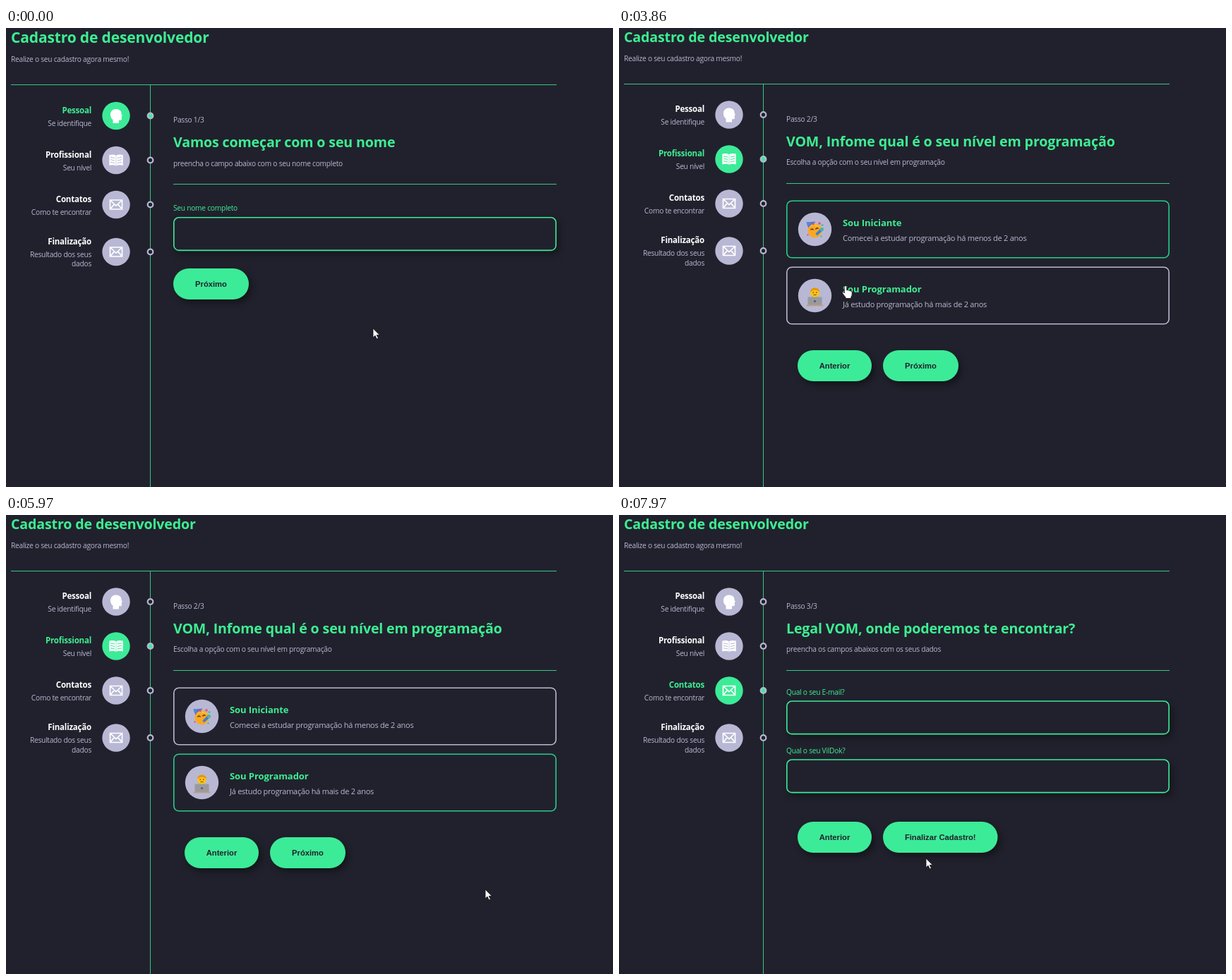
Animation of 860 by 651 pixels, one loop 8 s. Source, as an HTML page:

```html
<!DOCTYPE html>
<html lang="pt-BR">
<head>
<meta charset="utf-8">
<title>Cadastro</title>
<style>
  html, body { margin: 0; width: 100%; height: 100%; overflow: hidden; background: #21212d; }
  svg { display: block; width: 860px; height: 651px; }
  text { font-family: 'Open Sans', 'Noto Sans', sans-serif; white-space: pre; }
  .title { font-size: 19.6px; font-weight: 700; letter-spacing: -.007em; fill: #3def92; }
  .big { font-size: 21px; }
  .small { font-size: 10.2px; letter-spacing: -.0245em; fill: #b8b8d4; }
  .label { fill: #3def92; }
  .step { font-size: 11.5px; font-weight: 700; letter-spacing: -.0175em; fill: #fff; }
  .step.on { fill: #3def92; }
  .option { font-size: 13px; font-weight: 700; letter-spacing: -.005em; fill: #3def92; }
  .detail { font-size: 11px; letter-spacing: -.0235em; fill: #b8b8d4; }
  .value { font-size: 12px; fill: #fff; }
  .btn { font: 700 11.2px 'Liberation Sans', Arial, sans-serif; fill: #21212d; }
  .end { text-anchor: end; }
  .mid { text-anchor: middle; }
  .line { fill: #36c881; }
  .field { fill: #21212d; stroke: #3ceb97; stroke-width: 1.6; filter: drop-shadow(4px 5px 5px rgba(0, 0, 0, .35)); }
  .pill { fill: #3ceb97; filter: drop-shadow(4px 5px 5px rgba(0, 0, 0, .4)); }
  .card { fill: none; stroke: #b8b8d4; stroke-width: 1.6; }
  .card.on { stroke: #25cd89; }
</style>
</head>
<body>
<svg viewBox="0 0 860 651">
  <defs>
    <path id="head" fill="#fff" d="M-4.500 10.500V5.500C-10 1.500-9.500-9.500 0-9.500 6-9.500 8-5.500 7.500-2L9-.2 7.700 1 8 4.500C7.700 6.500 6 6.300 4 6.200V10.500Z"/>
    <g id="book">
      <path fill="#fff" d="M-9.700-7.500Q-4-9 0-6.700 4-9 9.700-7.500V7.500Q4 6 0 8-4 6-9.700 7.500Z"/>
      <path fill="none" stroke="currentColor" d="M-8-4.300-1.800-3M-8-.8-1.800.5M-8 2.700-1.800 4M8-4.300 1.800-3M8-.8 1.800.5M8 2.700 1.800 4"/>
      <path stroke="currentColor" stroke-width=".6" d="M0-6.500V8"/>
    </g>
    <path id="mail" fill="none" stroke="#fff" stroke-width="1.700" d="M-8.500-6.500H8.500V6.500H-8.500ZM-8.500-6.500 0 1.500 8.500-6.500M-8.500 6.500-2.500-.6M8.500 6.500 2.500-.6"/>
    <g id="party">
      <path fill="#6a6fc4" d="M-12-10 1-11-8 2Z"/>
      <path fill="#4d8be0" d="M-12-10-5-10.500-10-4Z"/>
      <circle cx="0" cy="2" r="10" fill="#f9a825"/>
      <path fill="#fbc02d" d="M-7-4A9.500 9.500 0 0 1 8-2Q2-6-7-4Z"/>
      <path fill="none" stroke="#5d3a1a" stroke-width="1.500" d="M-6 1q2-3 4 0M1 0q2-3 4-1"/>
      <path fill="#3f7fd0" d="M1 6 9-2 12 1 3 9Z"/>
      <circle cx="10" cy="0" r="2.600" fill="#4db6a0"/>
      <path fill="#e8505b" d="M5-10h3v3h-3zM-11 7h2v2h-2zM-3-8h2v2h-2z"/>
      <path fill="#43b97f" d="M9-7h3v2h-3zM8 9h2v2h-2z"/>
    </g>
    <g id="coder">
      <path fill="#5f8fb5" d="M-9 13V7Q-8 2 0 2T9 7V13Z"/>
      <circle cy="-4" r="6.500" fill="#fcc21b"/>
      <path fill="#e59600" d="M-6.500-5Q-6-11 0-11T6.500-5Q3-8 0-8T-6.500-5Z"/>
      <path fill="#7a4b12" d="M-3-5h1.500v1.500H-3zM1.500-5H3v1.500H1.500zM-2-1.500h4v1h-4z"/>
      <rect x="-10" y="2" width="20" height="12" rx="1" fill="#9a9a9e"/>
      <rect x="-12" y="13" width="24" height="2" fill="#b9a08a"/>
      <circle cy="8" r="1.600" fill="#5c5c60"/>
    </g>
  </defs>
  <g id="pages"></g>
  <path id="arrow" fill="#fff" stroke="#111" stroke-width=".8" d="M0 0V13L3 10.300 5.300 15 7.500 14 5.200 9.600H9.300Z"/>
  <path id="hand" fill="#fff" stroke="#111" stroke-width=".8" d="M-1.700 10V1.300Q-1.500-.5 0-.5T1.700 1.300V6Q3.500 4.700 4.600 6.500 6.300 5.500 7.200 7.300 9 6.800 9.200 8.800V12Q9 14 7.800 15.500V17.500H0V16Q-2.500 13-4.600 9.700-4.500 7.500-2.800 8.400Z"/>
</svg>
<script>
const user = 'VOM';
const $ = id => document.getElementById(id);
const text = (cls, x, y, s) => `<text class="${cls}" x="${x}" y="${y}">${s}</text>`;
const rect = (cls, x, y, w, h, rx = 0, id = '') =>
  `<rect ${id && `id="${id}"`} class="${cls}" x="${x}" y="${y}" width="${w}" height="${h}" rx="${rx}"/>`;
const use = (id, x, y, color) => `<use href="#${id}" x="${x}" y="${y}" color="${color}"/>`;
const frame = (cls, y, h, id) => rect(cls, 237.8, y + 0.8, 541.4, h - 1.6, 7.2, id);
const field = y => frame('field', y, 48.2);
const button = ([x, y, w, h], s) =>
  rect('pill', x, y, w, h, h / 2) + text('btn mid', x + w / 2, y + 26, s);

const steps = [
  { name: 'Pessoal', sub: ['Se identifique'], icon: 'head', y: 124.5 },
  { name: 'Profissional', sub: ['Seu nível'], icon: 'book', y: 187.5 },
  { name: 'Contatos', sub: ['Como te encontrar'], icon: 'mail', y: 250.5 },
  { name: 'Finalização', sub: ['Resultado dos seus', 'dados'], icon: 'mail', y: 317.5 }
];

// Clickable areas per page: x, y, width, height
const spots = [
  [[237, 341, 107, 44]],
  [[253, 457, 105, 44], [374, 457, 107, 44], [237, 244, 543, 82], [237, 338, 543, 82]],
  [[253, 435, 105, 44], [374, 435, 162.5, 44]]
];

function sidebar(active, dy) {
  return steps.map((s, i) => {
    const y = s.y + dy, on = i === active, up = s.sub.length > 1 ? 7 : 0;
    const color = on ? '#3ceb97' : '#b8b8d4';
    return text('step end' + (on ? ' on' : ''), 121, y - 4 - up, s.name) +
      s.sub.map((line, k) => text('small end', 121, y + 14 - up + k * 13.5, line)).join('') +
      `<circle cx="156" cy="${y}" r="19.700" fill="${color}"/>` + use(s.icon, 156, y, color) +
      `<circle cx="204.500" cy="${y}" r="3.800" fill="${on ? '#3ceb97' : '#21212d'}" stroke="#b8b8d4" stroke-width="2.200"/>`;
  }).join('');
}

function option(y, id, icon, name, detail) {
  return frame('card', y, 82.2, id) +
    `<circle cx="277.500" cy="${y + 41.1}" r="23.700" fill="#b8b8d4"/>` + use(icon, 277.5, y + 41.1) +
    text('option', 317, y + 36.4, name) + text('detail', 317, y + 57.4, detail);
}

function page(n, title, hint, body) {
  const first = n === 0, dy = first ? 0 : -1.5, top = first ? 80 : 79;
  return `<g id="page${n}">` +
    text('title' + (first ? ' big' : ''), 7, first ? 21 : 20, 'Cadastro de desenvolvedor') +
    text('small', 7, 48 + dy, 'Realize o seu cadastro agora mesmo!') +
    rect('line', 7, top, 773, 1) + rect('line', 204, top, 1, 600) + sidebar(n, dy) +
    text('small', 237, 134 + dy, `Passo ${n + 1}/3`) +
    text('title', 237, 169 + dy, title) +
    text('small', 237, 195.5 + dy, hint) +
    rect('line', 237, first ? 221 : 220, 543, 1) + body + '</g>';
}

$('pages').innerHTML =
  page(0, 'Vamos começar com o seu nome', 'preencha o campo abaixo com o seu nome completo',
    text('small label', 237, 259, 'Seu nome completo') + field(268) +
    '<text id="value" class="value" x="246" y="296"></text>' +
    '<rect id="caret" y="285" width="1" height="14" fill="#fff"/>' +
    button(spots[0][0], 'Próximo')) +
  page(1, user + ', Infome qual é o seu nível em programação', 'Escolha a opção com o seu nível em programação',
    option(244.4, 'junior', 'party', 'Sou Iniciante', 'Comecei a estudar programação há menos de 2 anos') +
    option(338.4, 'senior', 'coder', 'Sou Programador', 'Já estudo programação há mais de 2 anos') +
    button(spots[1][0], 'Anterior') + button(spots[1][1], 'Próximo')) +
  page(2, `Legal ${user}, onde poderemos te encontrar?`, 'preencha os campos abaixos com os seus dados',
    text('small label', 237, 255, 'Qual o seu E-mail?') + field(263.2) +
    text('small label', 237, 338, 'Qual o seu VilDok?') + field(346.2) +
    button(spots[2][0], 'Anterior') + button(spots[2][1], 'Finalizar Cadastro!'));

// Pointer path: time, x, y
const path = [
  [0, 520, 426], [130, 520, 426], [330, 432, 400], [3170, 432, 400], [3308, 424, 398],
  [3700, 321, 366], [4260, 321, 366], [4560, 470, 440], [4720, 552, 505], [4880, 525, 530],
  [4945, 525, 530], [5080, 548, 520], [5400, 560, 392], [5520, 560, 392], [5835, 679, 531],
  [5970, 679, 531], [6600, 610, 278], [6800, 610, 278], [7100, 560, 620], [7490, 491, 540],
  [7620, 491, 540], [7890, 435, 487], [8000, 435, 487]
];
const moves = [130, 3170, 4260, 5080, 5970, 6800, 7620];

function pointer(t) {
  const start = moves.filter(m => m <= t).pop() || 0;
  const q = t - (t - start) % 69;
  const i = path.findIndex(p => p[0] > q);
  const [t0, x0, y0] = path[i - 1], [t1, x1, y1] = path[i];
  const k = (q - t0) / (t1 - t0);
  return [Math.round(x0 + (x1 - x0) * k), Math.round(y0 + (y1 - y0) * k)];
}

const show = (id, on) => $(id).setAttribute('visibility', on ? 'visible' : 'hidden');
const within = (t, a, b) => t >= a && t < b;

function draw() {
  const t = performance.now() % 8000;
  const now = t < 3860 ? 0 : t < 7900 ? 1 : 2;
  for (let n = 0; n < 3; n++) $('page' + n).style.display = n === now ? '' : 'none';

  const typed = [1260, 1720, 2440].filter(k => t >= k).length;
  $('value').textContent = user.slice(0, typed);
  $('caret').setAttribute('x', [246, 254, 262, 272][typed]);
  show('caret', within(t, 130, 660) || within(t, 1190, 2240) || within(t, 2440, 2970));

  $('junior').classList.toggle('on', !within(t, 5460, 6800));
  $('senior').classList.toggle('on', within(t, 5460, 6730));

  const [x, y] = pointer(t);
  const over = spots[now].some(([l, top, w, h]) => x >= l && x < l + w && y >= top && y < top + h);
  for (const id of ['arrow', 'hand']) $(id).setAttribute('transform', `translate(${x} ${y})`);
  show('arrow', !over);
  show('hand', over);
  requestAnimationFrame(draw);
}
draw();
</script>
</body>
</html>
```
